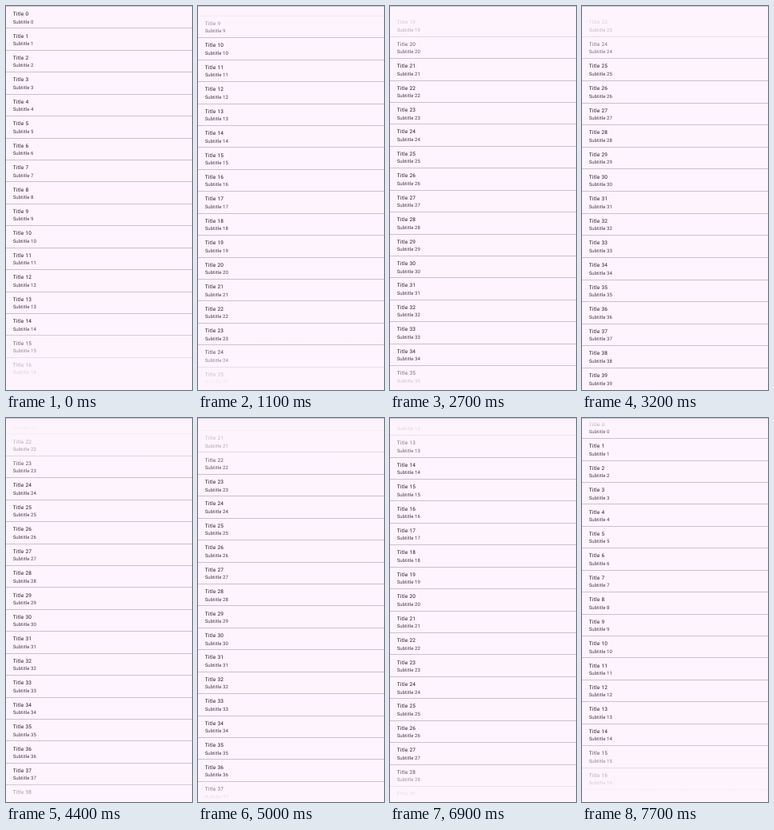
Recreate the animation shown at these times as an HTML page with a canvas. Size 233x480 px, loop 8000 ms.

```html
<!DOCTYPE html>
<html lang="en">
<head>
<meta charset="utf-8">
<title>Fading list</title>
<style>
html, body { margin: 0; width: 100%; height: 100%; overflow: hidden; background: #fef4fe; }
canvas { display: block; width: 233px; height: 480px; }
</style>
</head>
<body>
<canvas id="stage" width="233" height="480"></canvas>
<script>
const W = 233, H = 480, LOOP = 8000, STEP = 100;
const ROWS = 40, PITCH = 27.43, MAX_SCROLL = 617.6;
const BG = '254,244,254', LINE = '#c8c2cd';
const SWIPE_UP = 242.5;
const ctx = document.getElementById('stage').getContext('2d');

const flings = [
  { start: 400, duration: 900, distance: SWIPE_UP },
  { start: 1500, duration: 1000, distance: SWIPE_UP },
  { start: 2600, duration: 900, distance: SWIPE_UP },
  { start: 3900, duration: 1000, distance: -46 },
  { start: 4900, duration: 1100, distance: -132.7 },
  { start: 6300, duration: 900, distance: -114.3 },
  { start: 6900, duration: 800, distance: -322.3 }
];

const progress = (t, start, duration) => Math.min(1, Math.max(0, (t - start) / duration));

// Short finger drag, then a long slowdown
const flingEase = u => 1 - (1 - u ** 1.5) ** 3;

const scrollAt = t => flings.reduce((sum, f) =>
  Math.min(MAX_SCROLL, sum + f.distance * flingEase(progress(t, f.start, f.duration))), 0);

// Overscroll stretch after hitting the end of the list
const stretchAt = t => 1 + 0.0067 * Math.sin(Math.PI * progress(t, 2900, 600));

function label(text, y, size, spacing, color) {
  ctx.font = `400 ${size}px Roboto, sans-serif`;
  ctx.letterSpacing = spacing + 'px';
  ctx.fillStyle = color;
  ctx.fillText(text, 8.7, y);
}

function divider(y) {
  ctx.fillStyle = LINE;
  ctx.fillRect(0, Math.round(y), W, 1);
}

function fade(edge, length) {
  const end = edge ? edge - length : length;
  const g = ctx.createLinearGradient(0, edge, 0, end);
  g.addColorStop(0.12, `rgba(${BG},1)`);
  g.addColorStop(1, `rgba(${BG},0)`);
  ctx.fillStyle = g;
  ctx.fillRect(0, Math.min(edge, end), W, length);
}

function draw(t) {
  const scroll = scrollAt(t), stretch = stretchAt(t);
  const part = scroll / MAX_SCROLL;

  ctx.fillStyle = `rgb(${BG})`;
  ctx.fillRect(0, 0, W, H);
  ctx.textRendering = 'geometricPrecision';

  for (let n = 0; n < ROWS; n++) {
    const y = H + (n * PITCH - scroll - H) * stretch;
    if (y < -PITCH || y > H) continue;
    label('Title ' + n, y + 12.1, 6.5, 0.25, '#1d1b20');
    label('Subtitle ' + n, y + 21.6, 6, 0.06, '#3f3b45');
    if (n) divider(y);
  }

  if (part > 0) fade(0, 20 + 56 * part);
  if (part < 1) fade(H, 22 + 58 * (1 - part));
  divider(0);
}

function tick() {
  const t = performance.now() % LOOP;
  draw(Math.floor(t / STEP) * STEP);
  requestAnimationFrame(tick);
}
tick();
</script>
</body>
</html>
```
